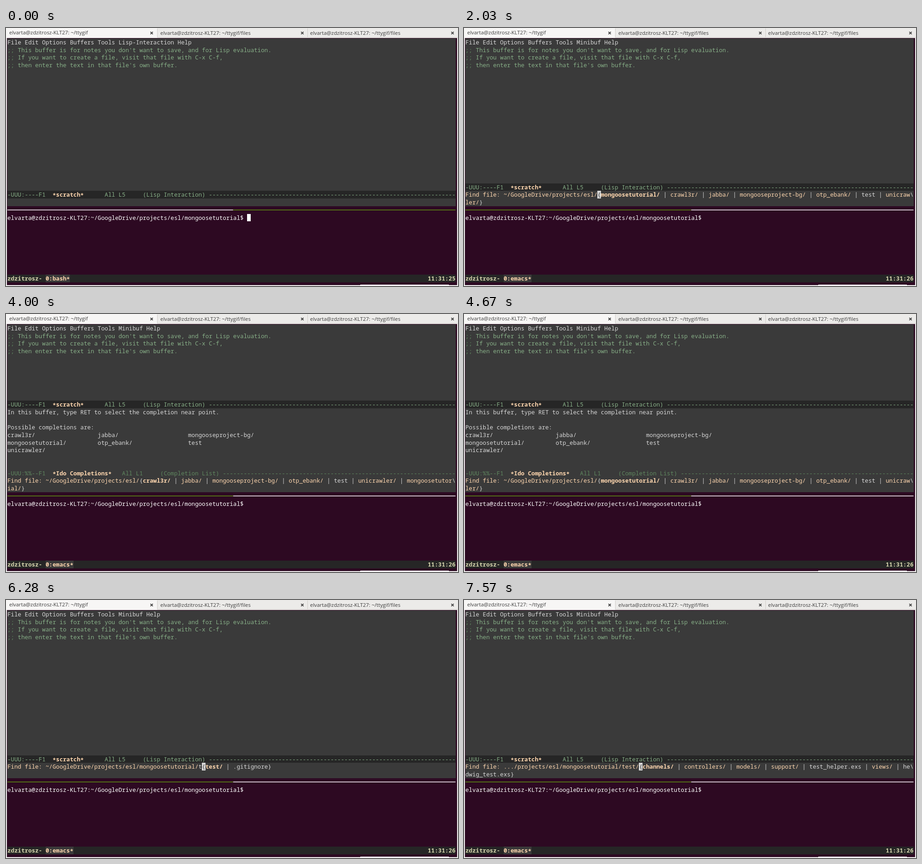
Recreate the animation shown at these times as an HTML page with a canvas. Size 990 by 566 pixels, loop 8 s.

```html
<!DOCTYPE html>
<html lang="en">
<head>
<meta charset="utf-8">
<title>Terminal session</title>
<style>
html, body { margin: 0; width: 100%; height: 100%; overflow: hidden; background: #f2f1f0; }
canvas { display: block; }
</style>
</head>
<body>
<canvas id="stage" width="990" height="566"></canvas>
<script>
const ctx = document.getElementById('stage').getContext('2d');
const LOOP = 8000, COLS = 129, CW = 7.609, RH = 16.73, LEFT = 3, TOP = 22.8;
const PURPLE = '#2d0922', BG = '#3a3a3a', BAR = '#262626', FG = '#d7d7d7', WHITE = '#ffffff';
const GREEN = '#87af87', DIM = '#5f875f', YELLOW = '#ffd7af', CREAM = '#d7d7af', ORANGE = '#d7af87';
const USER = 'elvarta', HOST = 'zdzitrosz';
const LOGIN = `${USER}@${HOST}-KLT27:`;
const ESL = '~/GoogleDrive/projects/esl/', TUTORIAL = ESL + 'mongoosetutorial/';

const PROJECTS = ['mongoosetutorial/', 'crawl3r/', 'jabba/', 'mongooseproject-bg/', 'otp_ebank/', 'test', 'unicrawler/'];
const ROTATED = [...PROJECTS.slice(1), PROJECTS[0]];
const SORTED = [...PROJECTS].sort();
const FILES = ['config/', '_build/', 'deps/', 'lib/', 'node_modules/', 'priv/', 'test/', 'web/',
  '.gitignore', 'README.md', 'mix.exs', 'mix.lock', 'package.json'];
const TESTS = ['channels/', 'controllers/', 'models/', 'support/', 'test_helper.exs', 'views/', 'hedwig_test.exs'];

const rowY = row => TOP + row * RH;
const colX = col => LEFT + col * CW;

function box(x, y, w, h, color) {
  ctx.fillStyle = color;
  ctx.fillRect(x, y, w, h);
}

function cells(row, col, w, h, color) {
  const x = Math.round(colX(col)), y = Math.round(rowY(row));
  box(x, y, Math.round(colX(col + w)) - x, Math.round(rowY(row + h)) - y, color);
}

function put(row, col, text, color = FG, bold = false) {
  ctx.font = `${bold ? 'bold ' : ''}12.68px "Noto Sans Mono", "DejaVu Sans Mono", monospace`;
  ctx.fillStyle = color;
  [...text].forEach((ch, i) => {
    const drop = ch === '*' ? 2 : 0;
    if (ch !== ' ') ctx.fillText(ch, colX(col + i), Math.round(rowY(row) + 13) + drop);
  });
}

function modeLine(row, name = '*scratch*', line = 'L5', mode = 'Lisp Interaction', active = true) {
  const color = active ? GREEN : DIM;
  cells(row, 0, COLS, 1, active ? BAR : BG);
  put(row, 0, active ? '-UUU:----F1' : '-UUU:%%--F1', color);
  put(row, 13, name, YELLOW, true);
  const col = 13 + name.length + (active ? 6 : 3);
  put(row, col, `All ${line}     (${mode}) `.padEnd(COLS - col, '-'), color);
}

// File prompt with its matches, wrapped over rows 20 and 21
function findFile(path, input, items, cursor = true) {
  const only = items.length === 1;
  const parts = [['Find file: ' + path, YELLOW], [input, FG], [only ? '[' : '{', FG, false, cursor]];
  items.forEach((item, i) => {
    if (i) parts.push([' | ', FG]);
    const color = only ? ORANGE : !i || item.endsWith('/') ? YELLOW : FG;
    parts.push([item, color, !i]);
  });
  parts.push([only ? ']' : '}', FG]);
  let row = 20, col = 0;
  for (const [text, color, bold, block] of parts) {
    for (const ch of text) {
      if (col === COLS - 1) {
        put(row++, col, '\\');
        col = 0;
      }
      if (block) cells(row, col, 1, 1, FG);
      put(row, col++, ch, block ? BG : color, bold);
    }
  }
}

function completions(t) {
  const done = t >= 3370;
  modeLine(10);
  put(11, 0, 'In this buffer, type RET to select the completion near point.');
  put(13, 0, 'Possible completions are:');
  SORTED.slice(0, done ? 7 : 6).forEach((name, i) => put(14 + Math.floor(i / 3), i % 3 * 26, name));
  if (done) modeLine(19, '*Ido Completions*', 'L1', 'Completion List', false);
}

function miniBuffer(t) {
  if (t < 3270) findFile(ESL, '', PROJECTS);
  else if (t < 5320) findFile(ESL, '', t >= 4000 && t < 4670 ? ROTATED : PROJECTS, false);
  else if (t < 6280) findFile(TUTORIAL, '', FILES);
  else if (t < 6520) findFile(TUTORIAL, 't', ['test/', '.gitignore']);
  else if (t < 7570) findFile(TUTORIAL, t < 6680 ? 'te' : t < 6840 ? 'tes' : 'test', ['test/']);
  else findFile('.../projects/esl/mongoosetutorial/test/', '', TESTS);
}

function tab(x, w, textX, y, title, closeX, color) {
  box(x, 0, w, 22, color);
  ctx.font = '11.4px "Open Sans", "Noto Sans", sans-serif';
  ctx.fillStyle = '#3c3c3c';
  ctx.fillText(LOGIN + ' ' + title, textX, y);
  ctx.strokeStyle = '#3c3c3c';
  ctx.lineWidth = 1.7;
  ctx.beginPath();
  for (const s of [-1, 1]) {
    ctx.moveTo(closeX - 2.7, 11 - 2.7 * s);
    ctx.lineTo(closeX + 2.7, 11 + 2.7 * s);
  }
  ctx.stroke();
}

function windowFrame() {
  box(0, 0, 990, 566, '#f2f1f0');
  tab(0, 332, 7, 14, '~/ttygif', 319, '#f7f6f5');
  tab(332, 328, 338, 15, '~/ttygif/files', 649, '#ecebe9');
  tab(660, 330, 666, 15, '~/ttygif/files', 978, '#ecebe9');
  box(331, 1, 1, 20, '#cfccc9');
  box(660, 1, 1, 20, '#cfccc9');
  box(332, 20, 658, 1, '#d8d5d2');
  box(2, 22, 986, 542, PURPLE);
  box(776, 563, 194, 2, WHITE);
}

function editor(t) {
  const finding = t >= 2030;
  cells(0, 0, COLS, 22, BG);
  put(0, 0, `File Edit Options Buffers Tools ${finding ? 'Minibuf' : 'Lisp-Interaction'} Help`);
  [
    "This buffer is for notes you don't want to save, and for Lisp evaluation.",
    'If you want to create a file, visit that file with C-x C-f,',
    "then enter the text in that file's own buffer."
  ].forEach((line, i) => {
    put(i + 1, 0, ';;', DIM);
    put(i + 1, 3, line, GREEN);
  });
  modeLine(finding ? 19 : 20);
  if (t >= 740 && !finding) cells(5, 0, 1, 1, FG);
  if (t >= 3270 && t < 5320) completions(t);
  if (finding) miniBuffer(t);
}

function shell(t) {
  const inEditor = t >= 740, olive = '#5f8f12', half = 65;
  box(LEFT, 398.5, half * CW, 1.5, inEditor ? olive : WHITE);
  box(colX(half), 398.5, (COLS - half) * CW, 1.5, inEditor ? WHITE : olive);
  put(23, 0, LOGIN + TUTORIAL.slice(0, -1) + '$', WHITE);
  if (!inEditor) cells(23, 69, 1, 1, WHITE);

  const job = t < 1150 ? '0:bash*' : '0:emacs*';
  cells(31, 0, COLS, 1, BAR);
  cells(31, 11, job.length, 1, BG);
  put(31, 0, HOST + '-', CREAM, true);
  put(31, 11, job, YELLOW, true);
  put(31, 121, inEditor ? '11:31:26' : '11:31:25', CREAM, true);
}

const start = performance.now();
function draw(now) {
  const t = Math.max(0, now - start) % LOOP;
  windowFrame();
  editor(t);
  shell(t);
  requestAnimationFrame(draw);
}
draw(start);
</script>
</body>
</html>
```
